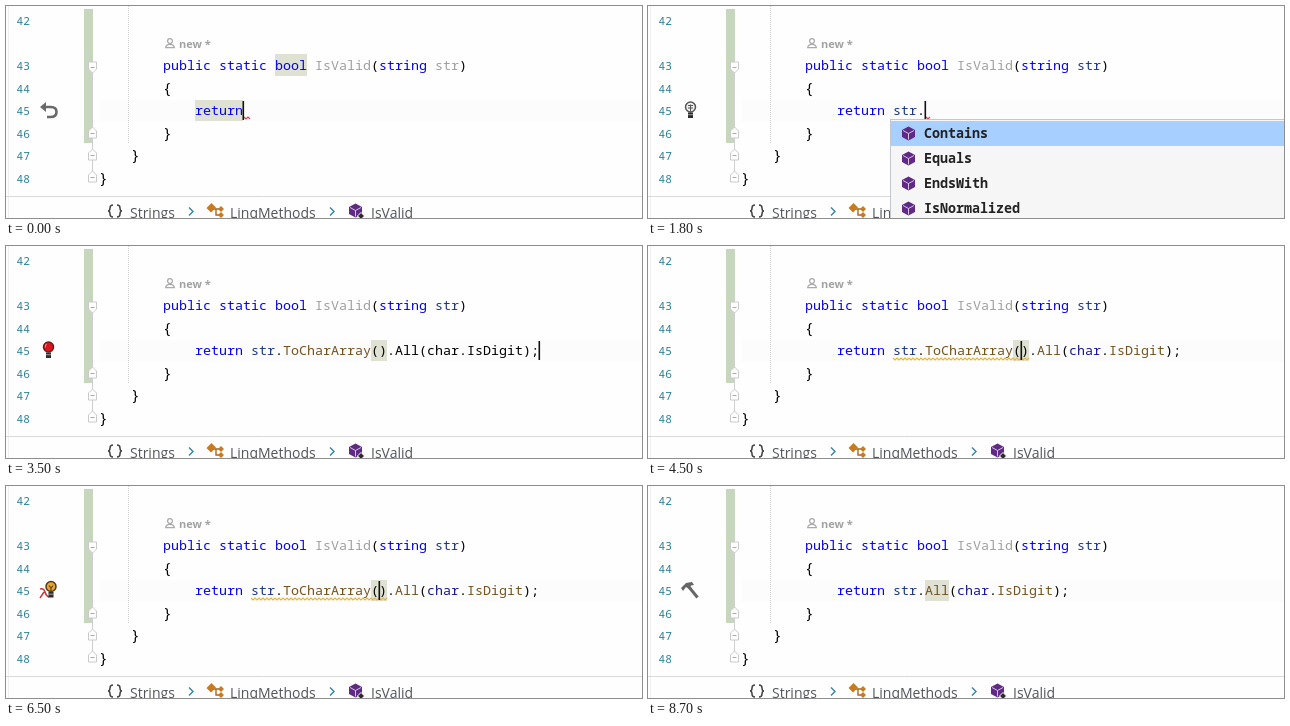
An HTML page for the animation above (8800 ms loop, 636 by 212 pixels).

```html
<!DOCTYPE html>
<html lang="en">
<head>
<meta charset="utf-8">
<title>Editor completion and quick fix</title>
<style>
  html, body { margin: 0; width: 100%; height: 100%; overflow: hidden; background: #fefefe; }
  svg { display: block; width: 636px; height: 212px; }
  text { white-space: pre; }
  .code { font: 13.333px "Noto Sans Mono", monospace; }
  .brace { font-size: 14.5px; }
  .num { font: 11.2px "Noto Sans Mono", monospace; fill: #2b8199; }
  .ui { font: 14px "Open Sans", sans-serif; fill: #52565c; }
  .author { font: bold 11px "Open Sans", sans-serif; fill: #a2a2a2; }
  .bold { font-weight: bold; }
</style>
</head>
<body>
<svg id="stage" viewBox="0 0 636 212"></svg>
<script>
const LOOP = 8800, CH = 8, X0 = 189;
const BLUE = '#0404e0', BROWN = '#74531f', NAVY = '#1f377f', INK = '#000', UNUSED = '#a0a0a0';
const MARK = '#dfe2d2', OLIVE = '#857512';
const stage = document.getElementById('stage');

const rect = (x, y, w, h, fill, extra = '') =>
  `<rect x="${x}" y="${y}" width="${w}" height="${h}" fill="${fill}" ${extra}/>`;
const path = (d, stroke, w = 1, fill = 'none') =>
  `<path d="${d}" fill="${fill}" stroke="${stroke}" stroke-width="${w}"/>`;
const text = (x, y, s, cls) => `<text x="${x}" y="${y}" class="${cls}">${s}</text>`;
const at = (x, y, s) => `<g transform="translate(${x} ${y})">${s}</g>`;
const span = (s, fill) => `<tspan fill="${fill}">${s}</tspan>`;
const code = (x, y, parts, cls = '') =>
  text(x, y, parts.map(p => span(...p)).join(''), 'code ' + cls);

function zigzag(x, y, width, color) {
  let d = `M${x} ${y}`;
  for (let i = 2; i <= width; i += 2) d += `L${x + i} ${y + (i % 4 ? 2 : 0)}`;
  return path(d, color, 1.2);
}

// Icons, each centred on its own origin
const braces = path('M-2 -6Q-5 -6 -5 -3T-7 0Q-5 0 -5 3T-2 6M2 -6Q5 -6 5 -3T7 0Q5 0 5 3T2 6', '#444', 1.5);
const chevron = path('M-2 -4L2 0L-2 4', '#35839c', 1.4);
const cube = path('M0 -7L6.5 -3.5V3.5L0 7L-6.5 3.5V-3.5Z', 'none', 0, '#5f2a86') +
  path('M-5.5 -3L0 0L5.5 -3M0 0V6', '#d9c3df', 1);
const memberIcon = cube + path('M5.5 2L9 5.5L5.5 9L2 5.5Z', '#fefefe', 1, '#2b2b2b');
const classIcon = path('M-2 -2H4M1 -2V4H4', '#a86a1c', 1.4) +
  path('M-3.5 -8L1 -3.5L-4 1.5L-8.5 -3ZM6 -5L9 -2L6 1L3 -2ZM6 1L9 4L6 7L3 4Z', 'none', 0, '#c87a20');
const paramIcon = path('M-6 -6Q-11 0 -6 6M6 -6Q11 0 6 6', '#333', 1.5) +
  path('M0 -4.5L4 -2V2.5L0 4.5L-4 2.5V-2Z', 'none', 0, '#222') + path('M-3 -1.5L0 0L3 -1.5', '#ddd');
const keyIcon = '<circle r="8.5" fill="#222"/><circle cx="-3" r="2.4" fill="none" stroke="#fff" stroke-width="1.7"/>' +
  path('M-.5 0H6M3 0V2.8M5.4 0V2.8', '#fff', 1.6);
const person = '<circle cy="-2.5" r="2.4" fill="none" stroke="#aaa" stroke-width="1.3"/>' +
  path('M-4.3 4.2Q-4 .8 0 .8T4.3 4.2Z', '#aaa', 1.3);

const bulb = (fill, line) =>
  `<circle cy="-2.5" r="5" fill="${fill}" stroke="${line}" stroke-width="1.5"/>` +
  rect(-2.5, 3, 5, 5.5, '#2c2c2c') + path('M-2.5 5.2H2.5', '#bbb', .8);

const gutter = {
  none: '',
  undo: at(43, 104, path('M-6 -3H2Q7.5 -3 7.5 2T1.5 7H-2', '#696969', 2.6) +
    path('M-3 -8L-9 -3L-3 2Z', 'none', 0, '#696969')),
  plain: at(42.5, 103.5, bulb('#f0f0f0', '#555') + path('M-2.5 -4H2.5M-2.5 -1.5H2.5M0 -5V2', '#555', 1)),
  red: at(42.5, 103.5, bulb('#d8161c', '#7c1518') + path('M-2 -5.5Q-3.5 -4 -3 -2', '#f08a8a', 1.2)),
  fix: path('M34 103Q38 102 39 106T43 111M38 106L34 112', '#c43c3c', 1.5) +
    at(45, 103, bulb('#eaa52c', '#4d3a1d') + path('M-2 -3.5L0 -1L2 -3.5M0 -1V3', '#5c431d', 1.2))
  ,
  hammer: at(42, 104, path('M-1 -3L7.5 7.5', '#666', 3) +
    path('M-9 -2L-4 -7L2 -8L4 -5L1 -4.5L-1 -1L-4 -3L-7 1Z', 'none', 0, '#666'))
};

// Time, typed line, caret column
const edits = [
  [0, 'return', 6], [600, 'return ', 7],
  [1000, 'return s', 8], [1100, 'return st', 9], [1200, 'return str', 10],
  [1700, 'return str.', 11], [2100, 'return str.T', 12], [2200, 'return str.To', 13],
  [2300, 'return str.ToCharArray()', 24], [2600, 'return str.ToCharArray().', 25],
  [2700, 'return str.ToCharArray().A', 26], [2800, 'return str.ToCharArray().All', 28],
  [2900, 'return str.ToCharArray().All(', 29], [3000, 'return str.ToCharArray().All(char', 33],
  [3100, 'return str.ToCharArray().All(char.', 34],
  [3200, 'return str.ToCharArray().All(char.IsDigit', 41],
  [3300, 'return str.ToCharArray().All(char.IsDigit)', 42],
  [3400, 'return str.ToCharArray().All(char.IsDigit);', 43],
  [4500, 'return str.ToCharArray().All(char.IsDigit);', 23],
  [6900, 'return str.All(char.IsDigit);', 11]
];
const icons = [[0, 'undo'], [600, 'none'], [1000, 'plain'], [2300, 'none'], [3400, 'red'],
  [4500, 'none'], [4900, 'fix'], [6900, 'none'], [8200, 'hammer']];
const latest = (list, t) => list.filter(e => e[0] <= t).pop();

// Freshly typed words stay black until the highlighter catches up
const early = { return: BLUE, str: NAVY, ToCharArray: BROWN };
const full = { ...early, char: '#18188c', All: BROWN, IsDigit: BROWN };
const paint = (line, tint) => line.split(/(\w+)/).filter(Boolean).map(w => [w, tint[w] || INK]);

function fold(y, down) {
  const s = down ? -1 : 1;
  return path(`M82.5 ${y + 5 * s}V${y - 2 * s}L86.5 ${y - 6 * s}L90.5 ${y - 2 * s}V${y + 5 * s}Z`, '#cacaca', 1, '#fff') +
    path(`M84.5 ${y + .5}H88.5`, '#aaa');
}

function backdrop() {
  const rows = [[42, 19], [43, 64], [44, 87], [45, 109], [46, 132], [47, 154], [48, 177]];
  return rect(0, 0, 636, 212, '#fefefe') + rect(94, 94, 542, 22, '#fcfcfc') +
    path('M2.5 0V212', '#f0f0f0') +
    rect(78, 3, 9, 134, '#c6d7bd') + path('M86.5 66V172', '#cfcfcf') +
    '<path d="M122.5 0V137" stroke="#d0d0d0" stroke-dasharray="1 1"/>' +
    fold(61, true) + fold(127) + fold(149) + fold(171) +
    rows.map(([n, y]) => text(10.5, y, n, 'num')).join('') +
    at(164, 37.5, person) + text(173, 42, 'new *', 'author') +
    path('M0 190.5H636', '#dadada') +
    at(109, 205, braces) + text(124, 211.5, 'Strings', 'ui') + at(185, 205.5, chevron) +
    at(209, 205, classIcon) + text(224, 211.5, 'LinqMethods', 'ui') + at(326, 205.5, chevron) +
    at(349.5, 204.5, memberIcon) + text(365, 211.5, 'IsValid', 'ui');
}

function popup(x, rows) {
  return rect(x + .5, 113.5, 640 - x, 110, '#f6f6f7', 'stroke="#c5c7d0"') +
    rect(x + 1, 115, 635 - x, 25, '#a7cfff') +
    rows.map(([icon, parts, cls], i) =>
      at(x + 18.5, 127.5 + 25 * i, icon) + code(x + 34, 132 + 25 * i, parts, cls)).join('');
}
const wordList = popup(210, [
  [paramIcon, [['str', OLIVE]]],
  [keyIcon, [['str', OLIVE], ['ing', INK]], 'bold'],
  [classIcon, [['Str', OLIVE], ['ing', INK], [' (in System)', '#777']]],
  [braces, [['Str', OLIVE], ['ings', INK]]]
]);
const memberList = popup(242, ['Contains', 'Equals', 'EndsWith', 'IsNormalized']
  .map(name => [cube, [[name, '#222']], 'bold']));

const base = backdrop();
const mark = (x, cols) => rect(x, 94, cols * CH, 21, MARK);
const brace = (x, y, s) => code(x, y, [[s, INK]], 'brace');

function scene(t) {
  const [since, line, col] = latest(edits, t);
  const within = (a, b) => t >= a && t < b;
  const caret = Math.floor((t - since) / 500) % 2 === 0;
  let s = base;

  if (t < 600) s += rect(269, 48, 32, 22, MARK) + mark(X0, 6);
  if (within(2300, 6900)) s += mark(X0 + 22 * CH, 2);
  if (t >= 7900) s += mark(X0 + 11 * CH, 3);

  s += code(157, 64, [['public static bool ', BLUE], ['IsValid', UNUSED], ['(', INK],
    ['string', BLUE], [' str', t < 1700 ? UNUSED : NAVY], [')', INK]]);
  s += brace(157, 87, '{') + brace(157, 132, '}') + brace(125, 154, '}') + brace(93, 177, '}');
  s += code(X0, 109, paint(line, t < 3700 ? early : full));

  if (t < 1700) s += zigzag(238, 111, 6, '#d8434e');
  else if (t < 3400) s += zigzag(X0 + col * CH + 1, 111, 5, '#d8434e');
  if (within(4100, 6900)) s += zigzag(245, 112, 136, '#e5b545');

  s += gutter[latest(icons, t)[1]];
  if (caret) s += rect(X0 + col * CH - .5, 95, 1.6, 19, '#111');
  if (within(1100, 1700)) s += wordList;
  if (within(1800, 2300)) s += memberList;
  return s;
}

let shown = '';
function frame(now) {
  const next = scene(now % LOOP);
  if (next !== shown) stage.innerHTML = shown = next;
  requestAnimationFrame(frame);
}
frame(0);
</script>
</body>
</html>
```
